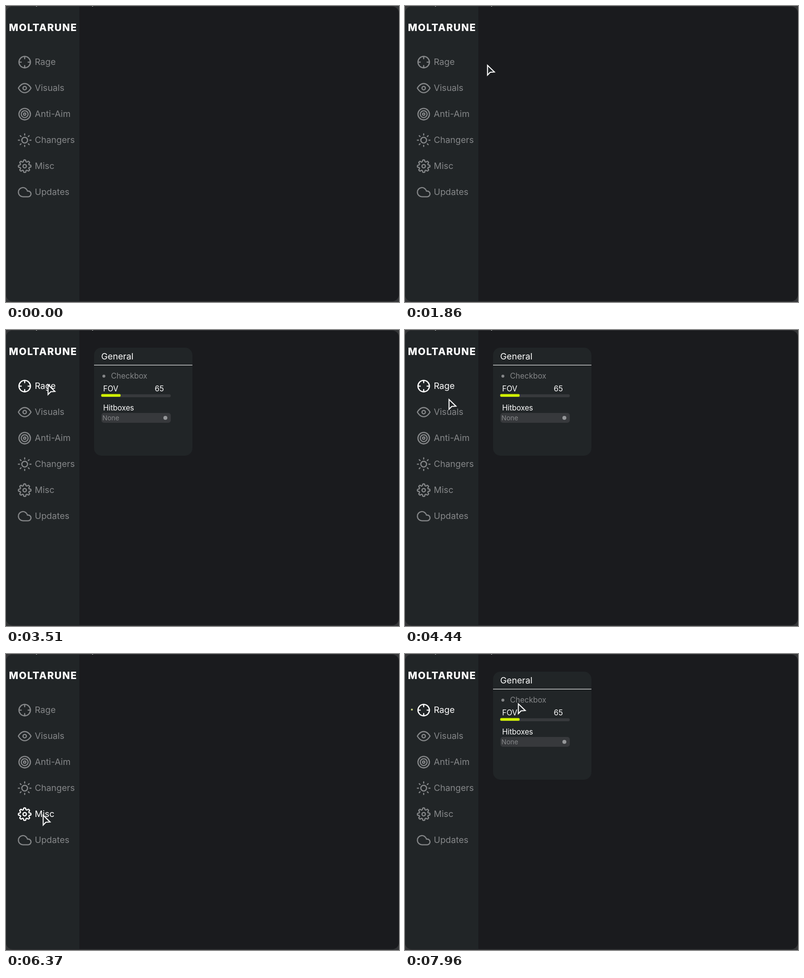
Animation of 799x603 px, one loop 8000 ms. Source, as an HTML page with a canvas:

```html
<!DOCTYPE html>
<html lang="en">
<head>
<meta charset="utf-8">
<title>Menu</title>
<style>
html, body { margin: 0; width: 100%; height: 100%; overflow: hidden; background: #353638; }
canvas { display: block; }
</style>
</head>
<body>
<canvas id="stage" width="799" height="603"></canvas>
<script>
const ctx = document.getElementById('stage').getContext('2d');
const LOOP = 8000;
const ENTER = 330, STEP = 69.36;
const LAG = 80; // the menu reacts slightly behind the pointer
const ROW_TOP = 114, ROW_STEP = 53;
const SIDE = '#212527', MAIN = '#1a1b1e', GREY = '#858789', FIELD = '#37393c';
const LIME = '#d0f000', MARK = '#c8d286', WHITE = '#fff';

const circle = (r) => `M${12 + r} 12a${r} ${r} 0 1 1 ${-2 * r} 0a${r} ${r} 0 1 1 ${2 * r} 0z`;

// A path turned n times around the icon's centre, plus a middle circle
function spin(part, n, r) {
  const path = new Path2D(circle(r));
  for (let i = 0; i < n; i++) {
    path.addPath(new Path2D(part), new DOMMatrix().translate(12, 12).rotate(360 / n * i).translate(-12, -12));
  }
  return path;
}

const GEAR = 'M19.4 15a1.65 1.65 0 0 0 .33 1.82l.06.06a2 2 0 0 1-2.83 2.83l-.06-.06a1.65 1.65 0 0 0-1.82-.33 1.65 1.65 0 0 0-1 1.51V21a2 2 0 0 1-4 0v-.09A1.65 1.65 0 0 0 9 19.4';

const tabs = [
  { name: 'Rage', icon: spin('M22 12h-4', 4, 10) },
  { name: 'Visuals', icon: new Path2D('M1 12s4-8 11-8 11 8 11 8-4 8-11 8-11-8-11-8z' + circle(3)) },
  { name: 'Anti-Aim', icon: new Path2D(circle(10) + circle(6) + circle(2)) },
  { name: 'Changers', icon: spin('M21 12h2', 8, 5) },
  { name: 'Misc', icon: spin(GEAR, 4, 3) },
  { name: 'Updates', icon: new Path2D('M18 10h-1.26A8 8 0 1 0 9 20h9a5 5 0 0 0 0-10z') }
];

// Places where the pointer turns or rests
const stops = [
  { t: ENTER, x: 605, y: 567 },
  { t: 954, x: 50, y: 134 },
  { t: 1640, x: 118, y: 107 },
  { t: 2210, x: 268, y: 142 },
  { t: 2549, x: 142, y: 105 },
  { t: 2780, x: 84, y: 109 },
  { t: 4200, x: 84, y: 109 },
  { t: 4422, x: 88, y: 139 },
  { t: 4700, x: 84, y: 165 },
  { t: 5070, x: 80, y: 165 },
  { t: 5420, x: 78, y: 234 },
  { t: 5680, x: 78, y: 234 },
  { t: 6430, x: 74, y: 328 },
  { t: 6750, x: 74, y: 372 },
  { t: 7054, x: 71, y: 167 },
  { t: 7280, x: 72, y: 100 },
  { t: 7550, x: 78, y: 112 },
  { t: 7950, x: 229, y: 99 }
];

// Each click selects the tab under the pointer
const clicks = [3510, 4800, 5740, 5990, 6300, 6700, 7480];

const smooth = (k) => k * k * (3 - 2 * k);
const snap = (t) => ENTER + Math.floor((t - ENTER) / STEP) * STEP;

function pointerAt(t) {
  const i = stops.findIndex((s) => s.t > t);
  if (i < 0) return stops[stops.length - 1];
  const a = stops[i - 1], b = stops[i];
  const k = smooth((t - a.t) / (b.t - a.t));
  return { x: a.x + (b.x - a.x) * k, y: a.y + (b.y - a.y) * k };
}

function tabAt(t) {
  const { x, y } = pointerAt(t);
  return x < 149 ? Math.round((y - ROW_TOP) / ROW_STEP) : -1;
}

function selectedAt(t) {
  const last = clicks.filter((c) => c <= t).pop();
  return last ? tabAt(last) : -1;
}

function box(x, y, w, h, r, color) {
  ctx.fillStyle = color;
  ctx.beginPath();
  ctx.roundRect(x, y, w, h, r);
  ctx.fill();
}

function disc(x, y, r, color) {
  box(x - r, y - r, 2 * r, 2 * r, r, color);
}

function label(text, x, y, size, color, weight = 400, spacing = 0) {
  ctx.font = `${weight} ${size}px Inter, sans-serif`;
  ctx.letterSpacing = spacing + 'px';
  ctx.fillStyle = color;
  ctx.fillText(text, x, y);
}

function drawWindow() {
  box(0, 0, 799, 603, 0, '#353638');
  box(61, 0, 2, 1, 0, '#d0d0d0');
  box(175, 0, 2, 1, 0, '#d0d0d0');
  box(0, 1, 799, 600.5, 14, MAIN);
  box(0, 1, 149, 600.5, [14, 0, 0, 14], SIDE);
  label('MOLTARUNE', 6, 50.8, 20, WHITE, 800, 1.4);
}

function drawTab(tab, i, lit, marked) {
  const y = ROW_TOP + i * ROW_STEP;
  const color = lit ? WHITE : GREY;
  ctx.save();
  ctx.translate(24, y - 13.7);
  ctx.scale(28 / 24, 28 / 24);
  ctx.lineWidth = 2;
  ctx.lineCap = ctx.lineJoin = 'round';
  ctx.strokeStyle = color;
  ctx.stroke(tab.icon);
  ctx.restore();
  label(tab.name, 58.5, y + 6, 17.8, color);
  if (marked) disc(14, y - 0.7, 2, MARK);
}

function drawPanel() {
  box(179, 36, 200, 220, 15, SIDE);
  label('General', 193.5, 60, 17.8, WHITE);
  box(179, 71, 200, 1, 0, WHITE);
  disc(199, 94, 3, GREY);
  label('Checkbox', 213.5, 99, 15.5, GREY);
  label('FOV', 197.5, 125, 15.3, WHITE);
  label('65', 302.5, 125, 15.3, WHITE);
  box(194, 131, 141, 6, 3, FIELD);
  box(193.5, 130.5, 39.5, 5.5, 2, LIME);
  label('Hitboxes', 197.5, 164, 15.2, WHITE);
  box(194, 169, 141, 20, 5, FIELD);
  label('None', 196, 183.5, 13.5, GREY);
  disc(324, 179, 4, '#959799');
}

function drawPointer({ x, y }) {
  ctx.save();
  ctx.translate(x, y);
  const arrow = new Path2D('M1.5 2.5v20l5.5-5.7 8.6-.6z');
  ctx.fillStyle = SIDE;
  ctx.fill(arrow);
  ctx.lineWidth = 2;
  ctx.strokeStyle = WHITE;
  ctx.stroke(arrow);
  ctx.restore();
}

function draw(t) {
  const selected = selectedAt(t);
  const shot = snap(t);
  const hovered = t < clicks[0] ? -1 : tabAt(shot - LAG);
  drawWindow();
  tabs.forEach((tab, i) => {
    const on = i === selected, over = i === hovered;
    drawTab(tab, i, on || over, on && !over);
  });
  if (selected === 0) drawPanel();
  if (t >= ENTER) drawPointer(pointerAt(shot));
}

const start = performance.now();
function frame() {
  draw((performance.now() - start) % LOOP);
  requestAnimationFrame(frame);
}
frame();
</script>
</body>
</html>
```
